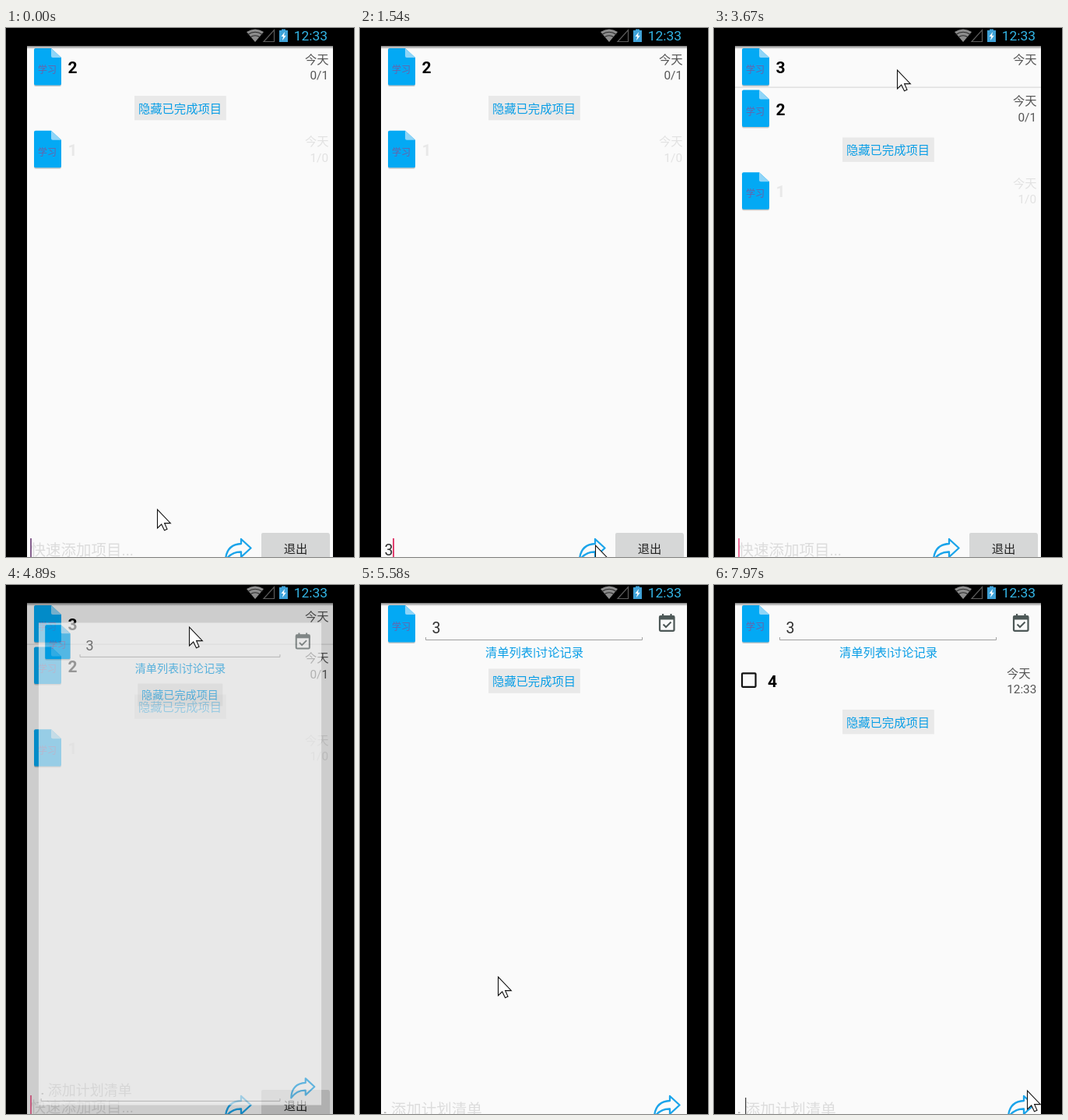
These frames come from a looping animation (447x679 px, 8000 ms). An HTML page:

```html
<!DOCTYPE html>
<html lang="zh-CN">
<head>
<meta charset="utf-8">
<title>清单</title>
<style>
  html, body { margin: 0; width: 100%; height: 100%; overflow: hidden; background: #000; }
  svg { display: block; }
  text { font-family: Roboto, "Noto Sans CJK SC", "Noto Sans CJK", "Noto Sans CJK JP", sans-serif; font-size: 15.3px; fill: #555; }
  .name { font-size: 21px; font-weight: 700; fill: #000; }
  .input { font-size: 19.5px; fill: #333; }
  .hint { font-size: 19.5px; fill: #dcdcdc; }
  .link { fill: #0a9ee6; }
  .end { text-anchor: end; }
  .mid { text-anchor: middle; }
  .done text.name { fill: #e8e8e8; }
  .done text.end { fill: #e2e2e2; }
</style>
</head>
<body>
<svg width="447" height="679" viewBox="0 0 447 679">
  <defs>
    <clipPath id="app"><rect x="27" y="23" width="393" height="656"/></clipPath>
    <linearGradient id="shade" x2="0" y2="1">
      <stop offset="0" stop-opacity=".5"/>
      <stop offset="1" stop-opacity="0"/>
    </linearGradient>
    <g id="file">
      <path d="M38 27H58L71 39V73Q71 75 69 75H38Q36 75 36 73V29Q36 27 38 27Z" fill="#000" opacity=".2"/>
      <path d="M38 26H58L71 38V71.5Q71 73.5 69 73.5H38Q36 73.5 36 71.5V28Q36 26 38 26Z" fill="#03a9f4"/>
      <path d="M58 26L71 38H60Q58 38 58 36Z" fill="#8fd5f8"/>
      <text x="53" y="58.3" class="mid" style="font-size:12px;fill:#6a62a8">学习</text>
    </g>
    <path id="arrow" d="M21 1L33.5 12.5L21 24V17.5Q9 17 1 28Q2 8 21 7Z" fill="none" stroke="#1ba4ea" stroke-width="2.3" stroke-linejoin="round"/>
    <g id="toggle">
      <rect x="165" y="87.5" width="118" height="31" fill="#000" opacity=".05"/>
      <rect x="165" y="87" width="117.5" height="31" fill="#e9e9e9"/>
      <text x="223.5" y="108.6" class="link mid">隐藏已完成项目</text>
    </g>
  </defs>

  <rect width="447" height="679"/>
  <g clip-path="url(#app)">
    <rect x="27" y="23" width="393" height="656" fill="#fafafa"/>
    <g id="list">
      <g id="added">
        <use href="#file"/>
        <text x="79.5" y="58" class="name">3</text>
        <text x="414.5" y="45.5" class="end">今天</text>
        <rect x="27" y="75.5" width="393" height="1.3" fill="#dcdcdc"/>
      </g>
      <g id="older">
        <use href="#file"/>
        <text x="79.5" y="58" class="name">2</text>
        <text x="414.5" y="45.5" class="end">今天</text>
        <text x="414" y="66" class="end">0/1</text>
        <use href="#toggle"/>
        <g class="done" transform="translate(0 105.7)">
          <use href="#file"/>
          <text x="79.5" y="58" class="name">1</text>
          <text x="414.5" y="45.5" class="end">今天</text>
          <text x="414" y="66" class="end">1/0</text>
        </g>
      </g>
      <text id="quick" x="31.5" y="676.8"></text>
      <rect id="quickCaret" y="655" width="2" height="24"/>
      <use href="#arrow" x="281" y="655"/>
      <rect x="328" y="649" width="88" height="40" rx="2" fill="#000" opacity=".15"/>
      <rect x="328" y="648" width="87.5" height="40" rx="2" fill="#d6d7d7"/>
      <text x="372" y="674" class="mid" style="fill:#222">退出</text>
    </g>

    <rect id="dim" x="27" y="23" width="393" height="656" opacity=".18"/>

    <g id="detail">
      <rect x="27" y="23" width="393" height="670" fill="#fafafa"/>
      <use href="#file"/>
      <text x="92.5" y="62" class="input">3</text>
      <path d="M84.5 67V70.5H362.5V67M30.5 684V687.5H362.5V684" fill="none" stroke="#a0a0a0"/>
      <rect x="31" y="676.5" width="2.5" height="1.5" fill="#b0b0b0"/>
      <g fill="none" stroke="#4d5857" stroke-width="2.2">
        <rect x="385" y="40" width="18.5" height="18.8" rx="1.5"/>
        <path d="M384.5 42H404" stroke-width="5"/>
        <path d="M389 37V41M399.5 37V41"/>
        <path d="M389.5 50.5L393 54L399.5 47.5" stroke-width="2"/>
      </g>
      <text x="224" y="92.3" class="link mid">清单列表|讨论记录</text>
      <g id="task">
        <rect x="36" y="113.3" width="17.5" height="17.5" rx="1" fill="none" stroke="#111" stroke-width="2.2"/>
        <text x="69" y="131" class="name">4</text>
        <text x="376" y="118.6">今天</text>
        <text x="414.3" y="139" class="end">12:33</text>
      </g>
      <use id="detailToggle" href="#toggle"/>
      <text id="plan" x="39.8" y="679.5"></text>
      <rect id="planCaret" y="658" width="1.3" height="24" fill="#444"/>
      <use href="#arrow" x="377" y="655"/>
    </g>
    <rect x="27" y="23" width="393" height="4" fill="url(#shade)"/>
  </g>

  <g>
    <path d="M320 18L309 5Q320 -2 331 5Z" fill="#8c8c8c"/>
    <path d="M310.5 8.5Q320 2 329.5 8.5M313.5 12Q320 7.5 326.5 12" fill="none" stroke="#2a2a2a" stroke-width="1.1"/>
    <path d="M344.5 2.5V17.5H331Z" fill="none" stroke="#5c5c5c" stroke-width="1.2"/>
    <path d="M354 1.5H359V3H362V18H351V3H354Z" fill="#3fa2d8"/>
    <path d="M358 5L353.5 11H356.2L355 16L359.8 9.7H357Z" fill="#fff"/>
    <text x="413" y="16" class="end" style="font-size:17.4px;fill:#33b5e5">12:33</text>
  </g>
  <path id="cursor" d="M.5 0V24L5.7 19L9.5 26.8L13 25.2L9.6 17.6H17.3Z" fill="#fff" stroke="#111" stroke-width="1.1"/>
</svg>
<script>
  const LOOP = 8000;
  const ids = ['added', 'older', 'quick', 'quickCaret', 'dim', 'detail', 'task',
    'detailToggle', 'plan', 'planCaret', 'cursor'];
  const el = Object.fromEntries(ids.map(id => [id, document.getElementById(id)]));

  // pointer path: first step, last step, number of steps, x, y
  const moves = [
    [70, 470, 7, 149, 669],
    [1140, 1540, 6, 302, 664],
    [1760, 1760, 1, 303, 662],
    [2010, 2320, 5, 293, 658],
    [2890, 3590, 10, 235, 54],
    [5350, 5580, 4, 177, 503],
    [5660, 5890, 4, 137, 668],
    [5970, 6130, 3, 144, 672],
    [6670, 6670, 1, 144, 690],
    [7340, 7650, 5, 402, 664],
    [7900, 7900, 1, 402, 649]
  ];
  // opening window: time, scale, opacity
  const opening = [[4890, .924, .6], [4970, .965, .82], [5040, .99, .95], [5120, 1, 1]];
  const caretColors = [[0, '#86608e'], [910, '#e0406f'], [2090, '#b0607f'], [3590, '#f0729c']];

  const ease = p => p * p * (3 - 2 * p);
  const latest = (table, t) => table.filter(row => row[0] <= t).pop();
  const show = (node, on) => node.setAttribute('visibility', on ? 'visible' : 'hidden');
  const shift = (node, x, y) => node.setAttribute('transform', `translate(${x} ${y})`);

  function progress(t, start, end, steps) {
    if (t < start) return 0;
    if (t >= end) return 1;
    return (Math.floor((t - start) / (end - start) * (steps - 1)) + 1) / steps;
  }

  function pointer(t) {
    let x = 194, y = 618;
    for (const [start, end, steps, tx, ty] of moves) {
      const p = ease(progress(t, start, end, steps));
      x += (tx - x) * p;
      y += (ty - y) * p;
    }
    return [x, y];
  }

  function field(node, caret, typed, hint, left) {
    node.textContent = typed || hint;
    node.setAttribute('class', typed ? 'input' : 'hint');
    caret.setAttribute('x', typed ? left + 11 : left);
  }

  function draw(t) {
    const added = t >= 2090;
    show(el.added, added);
    shift(el.older, 0, added ? 53.5 : 0);
    field(el.quick, el.quickCaret, t >= 910 && !added ? '3' : '', '快速添加项目...', 31);
    el.quickCaret.setAttribute('fill', latest(caretColors, t)[1]);

    const step = latest(opening, t);
    el.dim.style.display = el.detail.style.display = step ? '' : 'none';
    if (step) {
      const [, scale, opacity] = step;
      el.detail.setAttribute('transform', `translate(223.5 358) scale(${scale}) translate(-223.5 -358)`);
      el.detail.setAttribute('opacity', opacity);
    }

    const saved = t >= 7900;
    show(el.task, saved);
    shift(el.detailToggle, 0, saved ? 73 : 20.5);
    field(el.plan, el.planCaret, t >= 6890 && !saved ? '4' : '', '添加计划清单', 40);
    show(el.planCaret, t >= 6210);

    shift(el.cursor, ...pointer(t));
  }

  const began = performance.now();
  function tick() {
    draw((performance.now() - began) % LOOP);
    requestAnimationFrame(tick);
  }
  tick();
</script>
</body>
</html>
```
